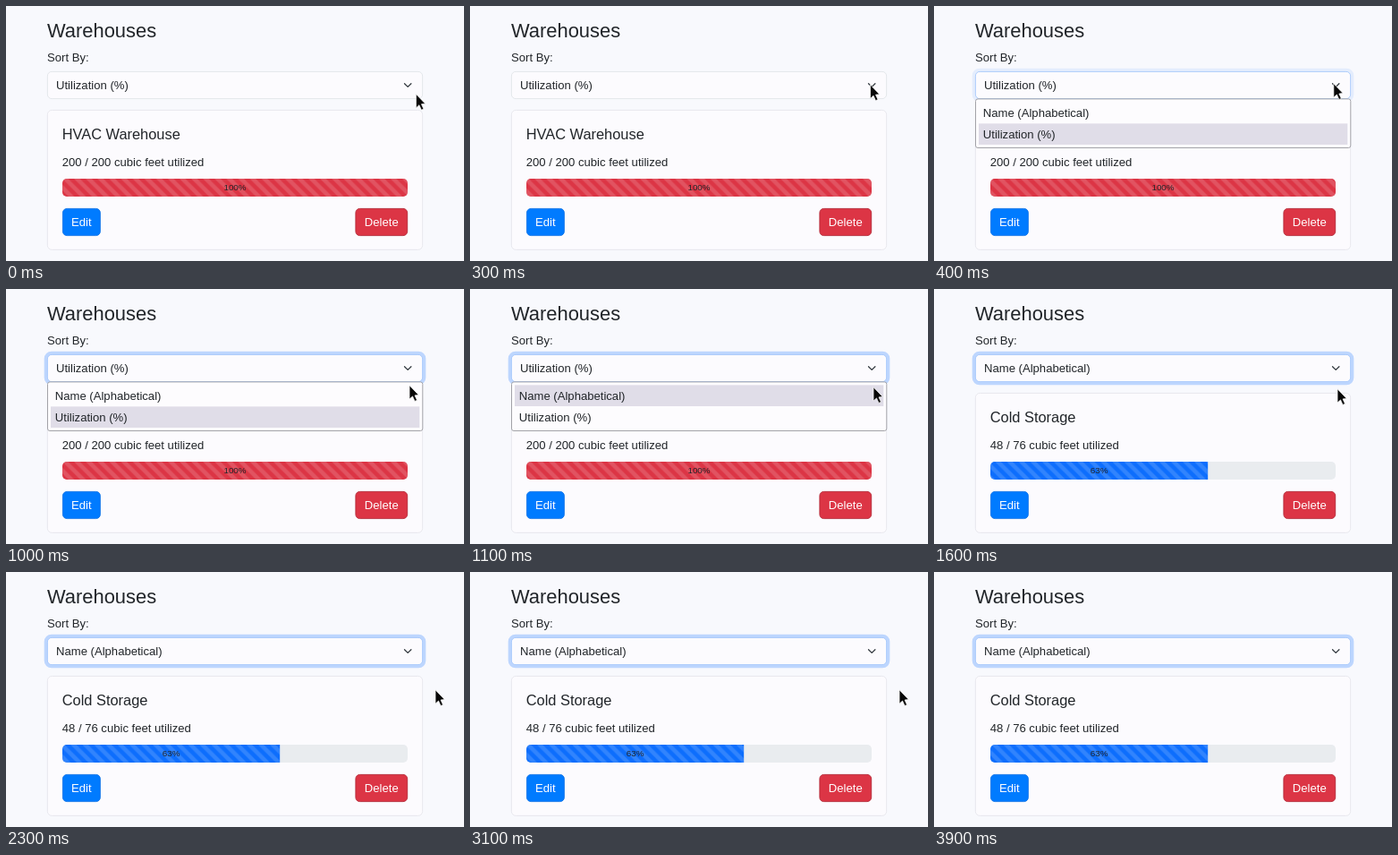
These frames come from a looping animation (512x285 px, 4 s). An HTML page:

```html
<!DOCTYPE html>
<html lang="en">
<head>
<meta charset="utf-8">
<title>Warehouses</title>
<style>
  html, body { margin: 0; width: 100%; height: 100%; overflow: hidden; background: #f8f9fd; }
  svg { display: block; width: 512px; height: 285px; }
  text { font: 13.1px "Liberation Sans", Arial, sans-serif; fill: #212529; }
  .title { font-size: 21.9px; }
  .name { font-size: 16.4px; }
  .pct { font-size: 9.83px; text-anchor: middle; }
  .btn { fill: #fff; text-anchor: middle; }
</style>
</head>
<body>
<svg viewBox="0 0 512 285">
  <defs>
    <pattern id="stripes" width="13.1" height="13.1" patternUnits="userSpaceOnUse">
      <path d="M0 6.55V13.1H6.55ZM0 0H6.55L13.1 6.55V13.1Z" fill="#fff" fill-opacity=".15"/>
    </pattern>
    <clipPath id="track"><rect x="63" y="193" width="386" height="20" rx="4.9"/></clipPath>
  </defs>

  <text class="title" x="46" y="35.3">Warehouses</text>
  <text x="46" y="62">Sort By:</text>

  <rect x="46.4" y="116.4" width="419.2" height="156" rx="4.9" fill="#fcfbfe" stroke="#e4e4ea" stroke-width=".8"/>
  <text class="name" id="name" x="62.7" y="149"></text>
  <text id="usage" x="62.7" y="179.3"></text>
  <g clip-path="url(#track)">
    <rect x="63" y="193" width="386" height="20" fill="#e9ecef"/>
    <rect id="bar" x="63" y="193" height="20"/>
    <rect id="barStripes" x="63" y="193" height="20" fill="url(#stripes)"/>
  </g>
  <text class="pct" id="pct" y="206.4"></text>

  <rect x="63.4" y="226.4" width="42" height="30.2" rx="4.7" fill="#007bff" stroke="#0a70e6" stroke-width=".8"/>
  <text class="btn" x="84.4" y="246">Edit</text>
  <rect x="390.9" y="226.4" width="57.8" height="30.2" rx="4.7" fill="#dc3545" stroke="#b52a38" stroke-width=".9"/>
  <text class="btn" x="419.8" y="246">Delete</text>

  <rect id="ring" x="42.7" y="69.7" width="426.6" height="37.6" rx="8.2" fill="#0d6efd" fill-opacity=".25"/>
  <rect id="select" x="46.4" y="73.4" width="419.2" height="30.2" rx="4.7" fill="#fcfbfe" stroke-width=".8"/>
  <text id="value" x="56" y="93.2"></text>
  <path d="M445.5 86.7L449.2 90.4L452.9 86.7" fill="none" stroke="#343a40" stroke-width="1.25" stroke-linecap="round" stroke-linejoin="round"/>

  <g id="menu">
    <rect x="46.5" y="103.9" width="419.3" height="54.6" rx="2.5" fill="#fdfcfe" stroke="#a3a3a8"/>
    <rect id="hover" x="50" width="412.3" height="23.6" fill="#e0dde8"/>
    <text x="54.8" y="124">Name (Alphabetical)</text>
    <text x="54.8" y="148">Utilization (%)</text>
  </g>

  <path id="cursor" d="M0 0V15.4L3.5 12.2L6 17.7L8.5 16.6L6 11.2L10.3 10.7Z" fill="#080808" stroke="#fff" stroke-width=".7" stroke-linejoin="round"/>
</svg>
<script>
  const LOOP = 4000, STEP = 100, REM = 13.1, TRACK = 386;
  const OPEN = 400, HOVER_NAME = 1100, PICK = 1600, CURSOR_OFF = 3300;
  const $ = id => document.getElementById(id);
  const set = (id, attrs) => {
    for (const key in attrs) $(id).setAttribute(key, attrs[key]);
  };

  const stores = {
    full: { name: 'HVAC Warehouse', usage: '200 / 200 cubic feet utilized', pct: 100, color: '#dc3545', sort: 'Utilization (%)' },
    cold: { name: 'Cold Storage', usage: '48 / 76 cubic feet utilized', pct: 63, color: '#0d6efd', sort: 'Name (Alphabetical)' }
  };

  // Cursor tip: time, x, y
  const path = [
    [0, 458.4, 98.5], [100, 457, 97], [300, 447.5, 88], [400, 446.8, 86.8],
    [600, 446.8, 87], [900, 451, 107.5], [1000, 451, 107.7], [1200, 451, 111.7],
    [1700, 451, 111.7], [1800, 453, 113], [2200, 480, 131.8], [4000, 480, 131.8]
  ];

  function tipAt(t) {
    const i = path.findIndex(p => p[0] > t);
    const [t0, x0, y0] = path[i - 1], [t1, x1, y1] = path[i];
    const k = (t - t0) / (t1 - t0);
    return [x0 + (x1 - x0) * k, y0 + (y1 - y0) * k];
  }

  function draw(t) {
    const store = t < PICK ? stores.full : stores.cold;
    const width = TRACK * store.pct / 100;
    $('name').textContent = store.name;
    $('usage').textContent = store.usage;
    $('value').textContent = store.sort;
    $('pct').textContent = store.pct + '%';
    set('pct', { x: 63 + width / 2 });
    set('bar', { width, fill: store.color });
    set('barStripes', { width });

    const shift = REM * (1 - t % 1000 / 1000);
    set('stripes', { patternTransform: `translate(${63 + shift} 193)` });

    const focus = t < OPEN ? 0 : t < OPEN + STEP ? 0.35 : 1;
    set('ring', { opacity: focus });
    set('select', { stroke: focus ? '#9dc3fb' : '#dee2e6' });

    set('menu', { visibility: t >= OPEN && t < PICK ? 'visible' : 'hidden' });
    set('hover', { y: t < HOVER_NAME ? 131.4 : 107.4 });

    const [x, y] = tipAt(t);
    set('cursor', { transform: `translate(${x} ${y})`, visibility: t < CURSOR_OFF ? 'visible' : 'hidden' });
  }

  const start = performance.now();
  function tick() {
    const t = (performance.now() - start) % LOOP;
    draw(Math.floor(t / STEP) * STEP);
    requestAnimationFrame(tick);
  }
  tick();
</script>
</body>
</html>
```
